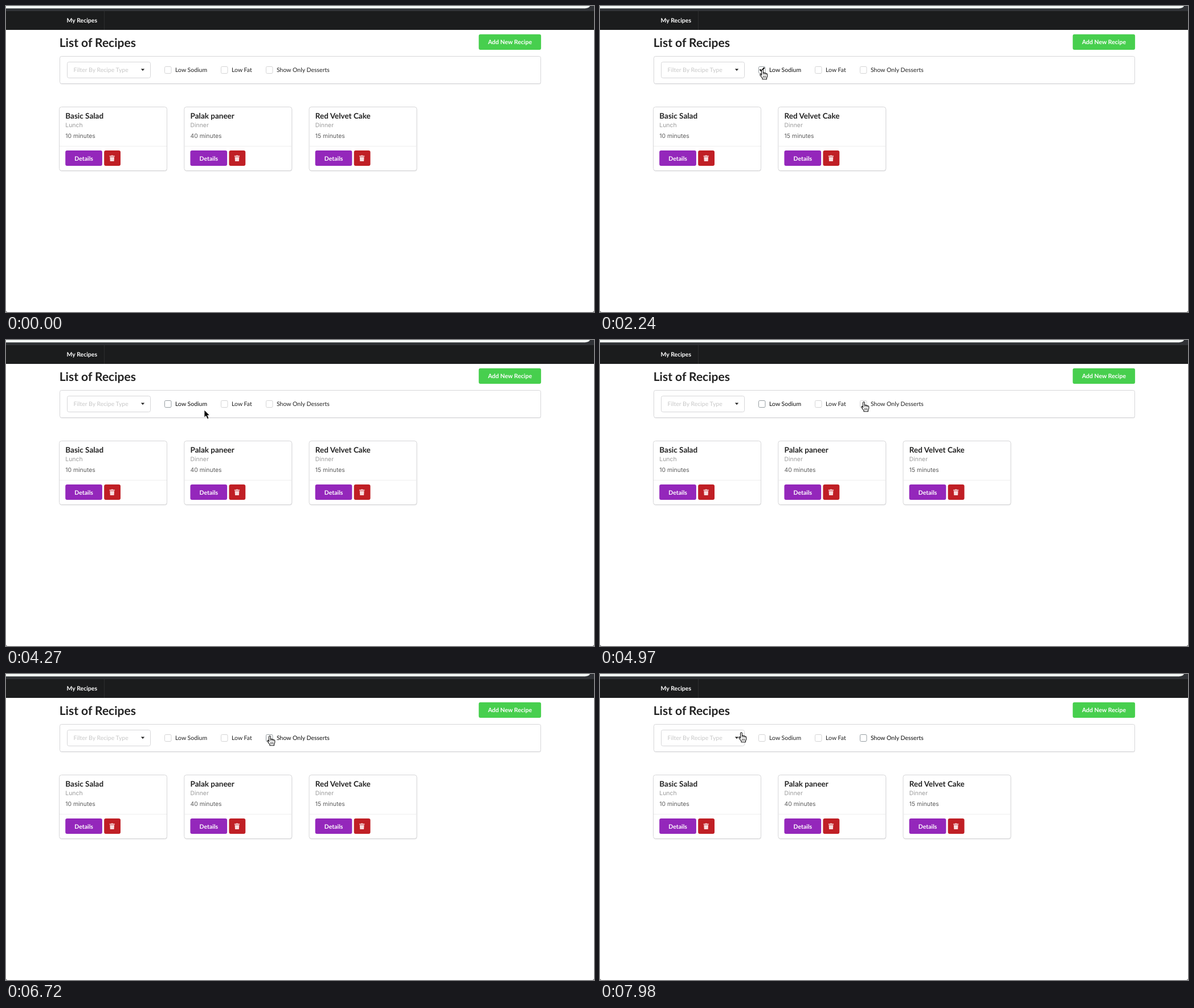
An HTML page for the animation above (8 s loop, 1032 by 538 pixels).

```html
<!DOCTYPE html>
<html lang="en">
<head>
<meta charset="utf-8">
<title>Recipes</title>
<style>
  html, body { margin: 0; width: 100%; height: 100%; overflow: hidden; background: #fff; }
  svg { display: block; }
  text { font: 10.5px Lato, sans-serif; fill: #222; text-rendering: geometricPrecision; }
  .bold { font-weight: 700; }
  .light { fill: #fff; }
  .title { font-size: 21px; }
  .name { font-size: 13.5px; }
  .hint { fill: #c8c8c8; }
  .info { font: 10.4px Inter, sans-serif; fill: #5c5c5c; }
  .meta { fill: #9b9b9b; }
  .frame { fill: #fff; stroke: #d6d6d8; }
  .box { fill: #fff; stroke: #d4d4d5; }
  .focus .box { stroke: #959da1; }
  .focus text { fill: #0d0d0d; }
  .tick { fill: none; stroke: #111; stroke-width: 2.2; }
</style>
</head>
<body>
<svg width="1032" height="538" viewBox="0 0 1032 538">
  <rect width="1032" height="9.5" fill="#303236"/>
  <path d="M0 0H1025Q1023 4.2 1015 4.2H0Z" fill="#f4faf6"/>
  <rect y="9" width="1032" height="33" fill="#1b1c1d"/>
  <rect x="172" y="9" width="1" height="33" fill="#2d2e2f"/>
  <path d="M0 535Q0 538 3 538H0ZM1032 535Q1032 538 1029 538H1032Z" fill="#555"/>
  <text class="bold light" x="106.5" y="29">My Recipes</text>
  <text class="bold title" x="93.7" y="71.5">List of Recipes</text>
  <rect x="829.7" y="49.8" width="109.4" height="27.2" rx="3" fill="#47cf4e"/>
  <text class="bold light" x="884.5" y="67" text-anchor="middle">Add New Recipe</text>
  <rect x="95" y="90" width="844" height="47.7" rx="3" fill="#e9e9ea"/>
  <rect class="frame" x="94.5" y="88.5" width="844" height="48" rx="3"/>
  <rect class="frame" x="107.5" y="98.5" width="146" height="28" rx="3"/>
  <text class="hint" x="118.5" y="116">Filter By Recipe Type</text>
  <path d="M236.8 110.5H243.2L240 114Z" fill="#222"/>
  <g id="checks"></g>
  <g id="cards"></g>
  <g id="cursor">
    <path id="arrow" d="M0 0V13.2L3 10.4L5.4 15.8L7.9 14.7L5.6 9.5H9.5Z" fill="#000" stroke="#fff" stroke-width=".8"/>
    <g id="hand" stroke="#111" stroke-linecap="round" stroke-linejoin="round">
      <path d="M-1.5 10V1.2Q-1.3-.3 0-.3T1.4 1.2V6Q2.8 4.6 4.1 6.2Q5.5 5.2 6.6 6.9Q8.8 6.4 8.8 8.6V11Q8.6 13 7.5 14.4V16.8H0V14.8Q-1.8 13-4.2 9.3Q-4.3 7.2-2.4 7.8Z" fill="#fff" stroke-width="1.1"/>
      <path d="M1.4 6V8.3M4.1 6.4V8.6M6.6 7V8.8M1.6 11V14M3.7 11V14M5.8 11V14" fill="none" stroke-width=".8"/>
    </g>
  </g>
</svg>
<script>
const el = id => document.getElementById(id);
const LOOP = 8000, STEP = 70, PITCH = 219.25;

const checks = [[278, 'Low Sodium', 'sodium'], [377, 'Low Fat', 'fat'], [456, 'Show Only Desserts', 'dessert']];
el('checks').innerHTML = checks.map(([x, label, id]) => `
  <g id="${id}">
    <rect class="box" x="${x + .5}" y="106.5" width="11.5" height="12" rx="2"/>
    <path class="tick" d="M${x + 2.5} 111.5l2.8 2.8 5.2-6"/>
    <text x="${x + 19}" y="116">${label}</text>
  </g>`).join('');

const recipes = [['Basic Salad', 'Lunch', 10], ['Palak paneer', 'Dinner', 40], ['Red Velvet Cake', 'Dinner', 15]];
el('cards').innerHTML = recipes.map(([name, meal, minutes]) => `
  <g>
    <rect x="94" y="179" width="189" height="111.7" rx="4" fill="#e7e7e8"/>
    <rect class="frame" x="93.5" y="177.5" width="189" height="112" rx="4"/>
    <text class="bold name" x="104.3" y="198">${name}</text>
    <text class="info meta" x="104.3" y="213">${meal}</text>
    <text class="info" x="104.3" y="232">${minutes} minutes</text>
    <rect x="94" y="246" width="188" height="1" fill="#eee"/>
    <rect x="104.2" y="254" width="64.7" height="27" rx="3" fill="#9427bb"/>
    <text class="bold light" x="136.6" y="272" text-anchor="middle">Details</text>
    <rect x="172.2" y="254" width="28.8" height="27" rx="3" fill="#c01f25"/>
    <path d="M181.6 263.3H190.8V264.8H181.6ZM184.4 263.3L185 262.4H187.4L188 263.3ZM182.3 265.5H190.1L189.6 273H182.8Z" fill="#f8dcdd"/>
  </g>`).join('');

// Pointer stops: time, x, y
const path = [
  [70, 400, 308], [840, 290, 118], [1120, 285, 112], [1400, 285, 112], [3990, 285, 112],
  [4270, 348, 123], [4900, 463, 109], [6930, 463, 109],
  [7350, 395, 492], [7770, 275, 97], [7980, 248, 103]
];

function pointer(t) {
  const i = path.findIndex(p => p[0] >= t);
  if (i < 1) return path[i ? path.length - 1 : 0].slice(1);
  const [t0, x0, y0] = path[i - 1], [t1, x1, y1] = path[i];
  const u = (t - t0) / (t1 - t0), k = u * u * (3 - 2 * u);
  return [x0 + (x1 - x0) * k, y0 + (y1 - y0) * k];
}

const within = (t, a, b) => t >= a && t < b;

function setCheck(id, on, focus) {
  el(id).classList.toggle('focus', focus);
  el(id).querySelector('.tick').style.opacity = +on;
}

function draw(now) {
  const t = Math.floor(now % LOOP / STEP) * STEP;
  const sodium = within(t, 1960, 3710), dessert = within(t, 5250, 6720);
  setCheck('sodium', sodium, within(t, 1610, 5180));
  setCheck('fat', false, false);
  setCheck('dessert', dessert, t >= 5180);

  const visible = [!dessert, !dessert && !sodium, true];
  let slot = 0;
  [...el('cards').children].forEach((card, i) => {
    card.style.display = visible[i] ? '' : 'none';
    if (visible[i]) card.setAttribute('transform', `translate(${PITCH * slot++} 0)`);
  });

  const hand = within(t, 1400, 4060) || within(t, 4830, 7000) || t >= 7840;
  el('hand').style.display = hand ? '' : 'none';
  el('arrow').style.display = hand ? 'none' : '';
  el('cursor').style.display = t < STEP ? 'none' : '';
  el('cursor').setAttribute('transform', `translate(${pointer(t).map(Math.round)})`);
}

const start = performance.now();
function tick() {
  draw(performance.now() - start);
  requestAnimationFrame(tick);
}
tick();
</script>
</body>
</html>
```
